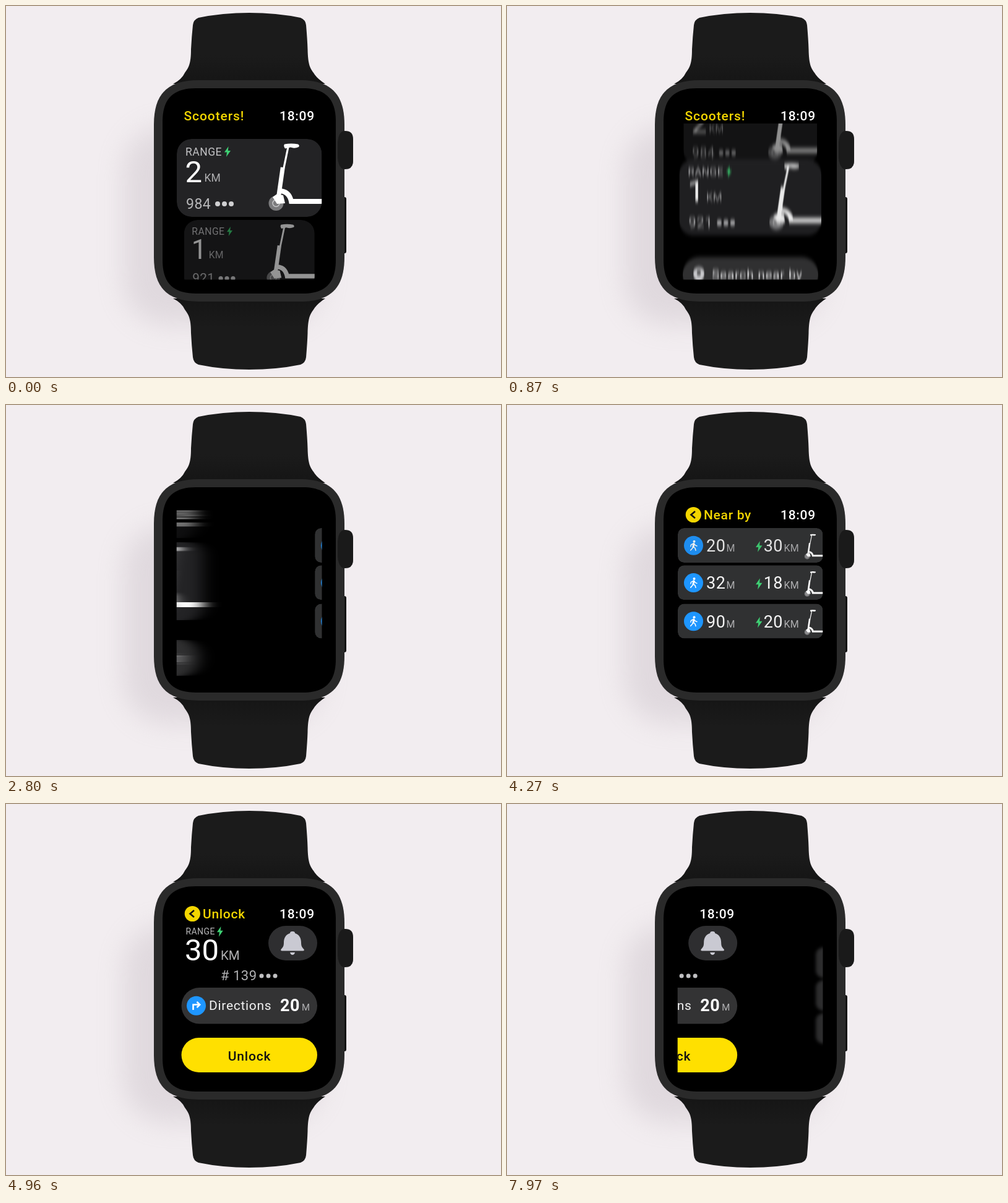
Recreate the animation shown at these times as an HTML page. Size 800x600 px, loop 8000 ms.

```html
<!DOCTYPE html>
<html lang="en">
<head>
<meta charset="utf-8">
<title>Scooter watch app</title>
<style>
  html, body { margin: 0; width: 100%; height: 100%; overflow: hidden; background: #f2edf0; }
  svg { display: block; width: 800px; height: 600px; }
  text { font-family: Roboto, sans-serif; letter-spacing: .5px; white-space: pre; }
</style>
</head>
<body>
<svg id="stage" viewBox="0 0 800 600"></svg>
<script>
const LOOP = 8000, STEP = 30, PAGE = 354;
const YELLOW = '#ffe000', BLUE = '#1e96ff', GREY = '#b0b0b2';

const text = (x, y, size, fill, str, extra = '') =>
  `<text x="${x}" y="${y}" font-size="${size}" fill="${fill}" ${extra}>${str}</text>`;
const box = (x, y, w, h, r, fill) =>
  `<rect x="${x}" y="${y}" width="${w}" height="${h}" rx="${r}" fill="${fill}"/>`;
const bolt = (x, y, s = 1) =>
  `<path transform="translate(${x} ${y}) scale(${s})" fill="#3ed073" d="M6.5 0L0 9.5H4L3 17L10 7H5.8z"/>`;
const dots = (x, y, gap, r, fill) =>
  [0, 1, 2].map(i => `<circle cx="${x + i * gap}" cy="${y}" r="${r}" fill="${fill}"/>`).join('');
const line = (d, w, stroke = '#fff') =>
  `<path d="${d}" fill="none" stroke="${stroke}" stroke-width="${w}"/>`;
const medium = 'font-weight="500"';

const clock = text(442, 185, 21, '#fff', '18:09', medium + ' style="letter-spacing:.7px"');
const backHeader = title => `<circle cx="301.3" cy="177.5" r="12.6" fill="#f3d600"/>
  ${line('M304 172l-6.5 5.5 6.5 5.5', 2.6, '#111')}
  ${text(318, 185, 21, '#f3d600', title, medium + ' style="letter-spacing:.7px"')}${clock}`;

const scooter = `<g id="scooter">
  <circle cx="436.5" cy="319" r="12" fill="#7b7b7d"/>
  <circle cx="436.5" cy="319" r="5.5" fill="none" stroke="#c4c4c6" stroke-width="1.5"/>
  ${line('M456 228L449 262', 3.2)}${line('M447.3 261L441 305', 7)}
  ${line('M441 299C453 299 459 306 461 316H512', 8)}
  <path fill="#fff" d="M450 223.5q11-2 22 0 3 2 1 4.500q-7 3-13 .5l-9 2q-3-4-1-7zM431 309l7-5 10 2 3 13-13 1z"/>
</g>`;

const card = (id, range, code) => `<g id="${id}" clip-path="url(#cardClip)">
  ${box(276, 215, 234.5, 126, 24, '#232325')}
  ${text(290, 241.5, 17.5, '#c2c2c4', 'RANGE')}${bolt(353, 227)}
  ${text(289.5, 284.5, 49, '#fff', range)}
  ${text(320.5, 284, 17.5, GREY, 'KM', 'style="letter-spacing:0"')}
  ${text(291, 327.5, 23, '#b8b8ba', code)}${dots(342, 320, 11, 4, '#cfcfd1')}
  <use href="#scooter"/></g>`;

const walker = `<circle cx="302.500" cy="220.800" r="2" fill="#fff"/>
  <g stroke-linecap="round" stroke-linejoin="round">
  ${line('M301.800 224.500L301 229.500', 3)}
  ${line('M301.500 224L297.500 226L296.800 228.800M302.500 224.500L304.500 227L307 228', 1.4)}
  ${line('M301 229.500L299.300 232L296.800 234.800M301.500 229.500L304 231.500L305 235', 1.6)}</g>`;

const row = (id, y, dist, range) => `<g transform="translate(0 ${y - 199})" clip-path="url(#rowClip)">
  ${box(276, 199, 234.5, 56, 10, '#303132')}
  <g id="${id}"><circle cx="301.500" cy="227.300" r="15.500" fill="${BLUE}"/>${walker}
  ${text(322, 237, 27, '#f4f4f4', dist)}${text(354.5, 237, 16, GREY, 'M')}
  ${bolt(402, 220, 1.05)}${text(446, 237, 27, '#f4f4f4', range, 'text-anchor="end"')}
  ${text(447.5, 237, 16, GREY, 'KM', 'style="letter-spacing:.3px"')}
  <use href="#scooter" transform="translate(321.500 125.300) scale(.375)"/></g></g>`;

const home = text(287.5, 185, 21, '#f3d600', 'Scooters!', medium + ' style="letter-spacing:.9px"') + clock + `
  <g clip-path="url(#listClip)"><g id="list">
  ${card('first', '2', '984')}${card('second', '1', '921')}
  <g id="search">${box(284, 380, 219, 58, 28, '#303031')}
  <path fill="#c9c9cc" fill-rule="evenodd" d="M310 424q-9-9-9-18a9 9 0 0 1 18 0q0 9-9 18zM310 402a3.500 3.500 0 1 0 .1 0z"/>
  ${text(331, 416, 21, '#e8e8ea', 'Search near by', 'style="letter-spacing:.65px"')}</g></g></g>`;

const nearBy = backHeader('Near by') +
  row('row', 199, '20', '30') + row('row2', 259.3, '32', '18') + row('row3', 321.5, '90', '20');

const unlock = backHeader('Unlock') + `
  ${text(290.5, 211, 14, '#b8b8ba', 'RANGE', 'style="letter-spacing:.4px"')}${bolt(341, 198, .98)}
  ${text(289, 253, 49, '#fff', '30', 'style="letter-spacing:0"')}
  ${text(347, 252, 20.5, GREY, 'KM', 'style="letter-spacing:0"')}
  ${box(424, 197, 79, 56, 28, '#2e2e30')}
  <path fill="#c9c9d2" d="M463 206c3 0 4 1 4 3c7 2 10 8 10 15c0 7 2 8 4.500 11q1 2.500-1.500 2.500H446q-2.500 0-1.500-2.500c2.500-3 4.500-4 4.500-11c0-7 3-13 10-15c0-2 1-3 4-3zM459 240h8q-1 4-4 4t-4-4z"/>
  ${text(347, 285, 22, GREY, '# 139')}${dots(413, 278, 11, 3.5, '#c0c0c2')}
  ${box(283.5, 297, 219.5, 58.5, 29, '#333334')}
  <circle cx="307.500" cy="326.300" r="15.500" fill="${BLUE}"/>
  ${line('M302.500 333V324.500H312M308.500 319.800L313.200 324.500L308.500 329.200', 2.6)}
  ${text(328, 333, 21, '#f2f2f2', 'Directions', 'style="letter-spacing:.7px"')}
  ${text(443, 335, 27, '#fff', '20', 'font-weight="600"')}${text(478, 334, 15, GREY, 'M')}
  <g id="unlockButton">${box(283.5, 378, 219.5, 56, 28, YELLOW)}
  ${text(393.5, 414.5, 21, '#111', 'Unlock', medium + ' text-anchor="middle" style="letter-spacing:.8px"')}</g>`;

const ride = [232, 285, 338.5].map(y => box(276, y, 219, 49, 12, '#2c2c2d')).join('');

const clip = (id, x, y, w, h, r = 0) => `<clipPath id="${id}">${box(x, y, w, h, r, '#000')}</clipPath>`;
const blur = (id, dev) => `<filter id="${id}" filterUnits="userSpaceOnUse" x="0" y="0" width="1000" height="700"
  color-interpolation-filters="sRGB"><feGaussianBlur stdDeviation="${dev}"/></filter>`;
const page = (id, body) => `<g id="${id}">${body}</g>`;

const strap = `<path id="strap" fill="url(#strapFill)" d="M302 31Q303 22 311 19Q350 11 393 11Q437 11 476 19
  Q484 22 485 31Q487 55 487.500 70C488 96 492 101 497 108Q502 117 516 126H270Q284 119 289 108
  C295 100 299 94 299 70Q300 50 302 31z"/>`;
const watch = `${box(190, 195, 320, 320, 70, '#b6abb4').replace('/>', ' opacity=".3" filter="url(#soft)"/>')}
  ${strap}<use href="#strap" transform="matrix(1 0 0 -1 0 599)"/>
  ${box(542, 309, 8, 91, 3, '#141414')}
  <path fill="#2a2a2a" d="M239 192C239 142 261 120 311 120H475C525 120 547 142 547 192V406C547 456 525 478 475 478H311C261 478 239 456 239 406z"/>
  <path fill="#000" d="M253 187C253 150 270 133 307 133H479C516 133 533 150 533 187V411C533 448 516 465 479 465H307C270 465 253 448 253 411z"/>
  <path fill="#1a1a1a" d="M536 222Q537 202 548 202Q561 202 561 215V251Q561 264 548 264Q537 264 536 244z"/>`;

document.getElementById('stage').innerHTML = `<defs>
  <linearGradient id="strapFill" x1="0" y1="0" x2="0" y2="1"><stop offset=".6" stop-color="#1b1b1b"/>
  <stop offset="1" stop-color="#151515"/></linearGradient>
  ${clip('screenClip', 275.7, 164, 234.8, 279)}${clip('listClip', 275, 190, 236, 252.5)}
  ${clip('cardClip', 276, 215, 234.5, 126, 24)}${clip('rowClip', 276, 199, 234.5, 56, 10)}
  ${blur('soft', 22)}${blur('scrollBlur', 0)}${blur('slideBlur', 0)}${blur('rideBlur', 2.5)}
  ${scooter}</defs>
  <rect width="800" height="600" fill="#f2edf0"/>${watch}
  <g clip-path="url(#screenClip)">
  ${page('home', home)}${page('nearBy', nearBy)}${page('unlock', unlock)}${page('ride', ride)}</g>`;

const $ = id => document.getElementById(id);
const set = (id, name, value) => $(id).setAttribute(name, value);
const mix = (a, b, p) => a + (b - a) * p;
const ease = (p, lag) => { const q = Math.max(p, 0) ** lag; return q * q * (3 - 2 * q); };
const count = (t, start, n) => Math.min(n, Math.max(0, Math.floor((t - start + .5) / STEP) + 1));

function motion(t, start, n, lag) {
  const k = count(t, start, n), pos = ease(k / n, lag);
  return { pos, speed: k < n ? pos - ease((k - 1) / n, lag) : 0 };
}

// Dims in four steps, holds, then recovers.
function press(t, start) {
  const k = count(t, start, 10);
  return 1 - .075 * Math.min(k, 10 - k, 4);
}

function place(id, x, visible) {
  set(id, 'transform', `translate(${x} 0)`);
  set(id, 'display', visible ? 'inline' : 'none');
}

function placeCard(id, top, scale, opacity) {
  set(id, 'transform', `translate(393.25 ${top}) scale(${scale}) translate(-393.25 -215)`);
  set(id, 'opacity', opacity);
}

function smear(id, filter, x, y) {
  if (x + y > .05) {
    $(filter).firstElementChild.setAttribute('stdDeviation', `${x} ${y}`);
    set(id, 'filter', `url(#${filter})`);
  } else $(id).removeAttribute('filter');
}

function draw(t) {
  const scroll = motion(t, 510, 17, 1.3), e = scroll.pos;
  placeCard('first', mix(215, 102, e ** 1.8), mix(1, .9, e), mix(1, .45, e));
  placeCard('second', mix(346, 222, e), mix(.9, 1, e), mix(.58, 1, e));
  set('search', 'transform', `translate(0 ${mix(124, 0, e)})`);
  smear('list', 'scrollBlur', 0, scroll.speed * 38);

  set('search', 'opacity', press(t, 2380));
  set('row', 'opacity', press(t, 4270));
  set('unlockButton', 'opacity', press(t, 7460));

  const [a, b, c] = [2650, 4690, 7820].map(start => motion(t, start, 10, 1.735));
  place('home', -520 * a.pos, a.pos < 1);
  place('nearBy', PAGE * (1 - a.pos - b.pos), a.pos > 0 && b.pos < 1);
  place('unlock', PAGE * (1 - b.pos - c.pos), b.pos > 0 && c.pos < 1);
  place('ride', PAGE * (1 - c.pos), c.pos > 0);
  smear('home', 'slideBlur', a.speed * 85, 0);
  smear('ride', 'rideBlur', 2.5, 2.5);
}

const begin = performance.now();
function tick() {
  draw((performance.now() - begin) % LOOP);
  requestAnimationFrame(tick);
}
tick();
</script>
</body>
</html>
```
